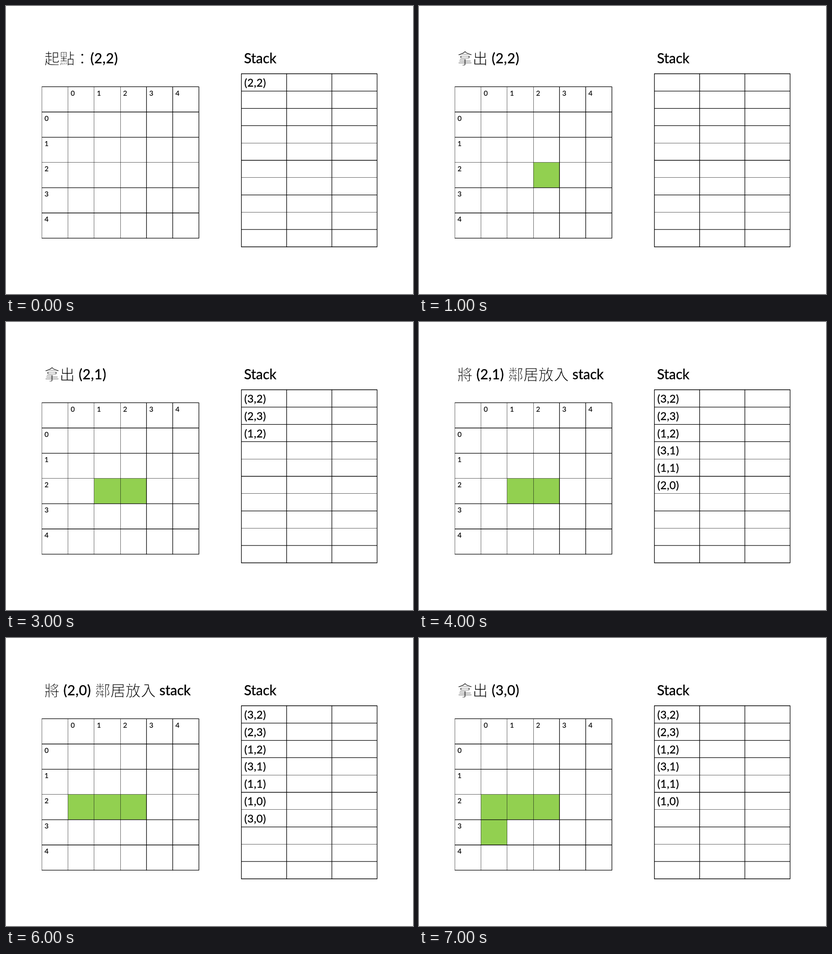
An HTML page with a canvas that plays this animation: 890 by 629 pixels, repeating every 8000 ms.

```html
<!DOCTYPE html>
<html lang="zh-Hant">
<head>
<meta charset="utf-8">
<style>
  html, body { margin: 0; width: 100%; height: 100%; overflow: hidden; background: #fff; }
  canvas { display: block; }
</style>
</head>
<body>
<canvas id="stage" width="890" height="629"></canvas>
<script>
const ctx = document.getElementById('stage').getContext('2d');
const STEP = 1000;
const GRID = { x: 78.3, y: 176.4, w: 57.25, h: 55.12, cols: 6, rows: 6, thinX: [0, 1, 2, 3], thinY: [3] };
const STACK = { x: 514.7, y: 148, w: 98.93, h: 37.8, cols: 3, rows: 10, thinX: [], thinY: [4, 6, 8] };

const start = cell => [['起點：', 84], [cell, 184.5]];
const pop = cell => [['拿出', 84], [cell, 159]];
const push = cell => [['將', 84], [cell, 125.5], ['鄰居放入', 195], ['stack', 335.5]];

// Each step: title, visited cells (row,column), stack contents
const base = '(3,2) (2,3) (1,2)';
const steps = [
  [start('(2,2)'), '', '(2,2)'],
  [pop('(2,2)'), '22', ''],
  [push('(2,2)'), '22', base + ' (2,1)'],
  [pop('(2,1)'), '22 21', base],
  [push('(2,1)'), '22 21', base + ' (3,1) (1,1) (2,0)'],
  [pop('(2,0)'), '22 21 20', base + ' (3,1) (1,1)'],
  [push('(2,0)'), '22 21 20', base + ' (3,1) (1,1) (1,0) (3,0)'],
  [pop('(3,0)'), '22 21 20 30', base + ' (3,1) (1,1) (1,0)']
];

function latin(str, x, y, size) {
  ctx.font = `${size}px Lato, sans-serif`;
  ctx.letterSpacing = str[0] === '(' ? '0.02em' : '0px';
  ctx.fillStyle = ctx.strokeStyle = '#000';
  ctx.lineWidth = size * 0.014;
  ctx.fillText(str, x, y);
  ctx.strokeText(str, x, y);
}

// A white outline thins the strokes of the Chinese glyphs
function chinese(str, x, y) {
  ctx.font = '300 33.2px "Noto Sans CJK TC", "Noto Sans CJK", sans-serif';
  ctx.letterSpacing = '0px';
  ctx.fillStyle = '#000';
  ctx.strokeStyle = '#fff';
  ctx.lineWidth = 1.1;
  ctx.fillText(str, x, y);
  ctx.strokeText(str, x, y);
}

// Thin lines sit on one pixel, the others may spread over two
const place = (v, thin) => thin ? Math.floor(v) + 0.5 : v;

function line(x1, y1, x2, y2, thin) {
  ctx.lineWidth = thin ? 1 : 1.3;
  ctx.strokeStyle = thin ? 'rgba(0,0,0,.62)' : '#000';
  ctx.beginPath();
  ctx.moveTo(x1, y1);
  ctx.lineTo(x2, y2);
  ctx.stroke();
}

function table({ x, y, w, h, cols, rows, thinX, thinY }) {
  const right = x + cols * w, bottom = y + rows * h;
  for (let c = 0; c <= cols; c++) {
    const thin = thinX.includes(c), px = place(x + c * w, thin);
    line(px, y - 0.5, px, bottom + 0.5, thin);
  }
  for (let r = 0; r <= rows; r++) {
    const thin = thinY.includes(r), py = place(y + r * h, thin);
    line(x, py, right, py, thin);
  }
}

function draw(now) {
  const [title, visited, stack] = steps[Math.floor(now / STEP) % steps.length];
  ctx.fillStyle = '#fff';
  ctx.fillRect(0, 0, 890, 629);

  ctx.fillStyle = '#92d050';
  for (const [r, c] of visited.split(' ').filter(Boolean))
    ctx.fillRect(GRID.x + (+c + 1) * GRID.w, GRID.y + (+r + 1) * GRID.h, GRID.w, GRID.h);
  table(GRID);
  table(STACK);

  for (const [str, x] of title)
    str.charCodeAt(0) < 128 ? latin(str, x, 124.5, 30) : chinese(str, x, 126.5);
  latin('Stack', 520.5, 124.5, 30);
  for (let i = 0; i < 5; i++) {
    latin(String(i), GRID.x + (i + 1) * GRID.w + 6, 195.5, 15.3);
    latin(String(i), GRID.x + 6, 195.5 + (i + 1) * GRID.h, 15.3);
  }
  stack.split(' ').forEach((cell, i) => latin(cell, 521, 176 + i * STACK.h, 23.7));
}

const origin = performance.now();
function tick() {
  draw(performance.now() - origin);
  requestAnimationFrame(tick);
}
tick();
</script>
</body>
</html>
```
